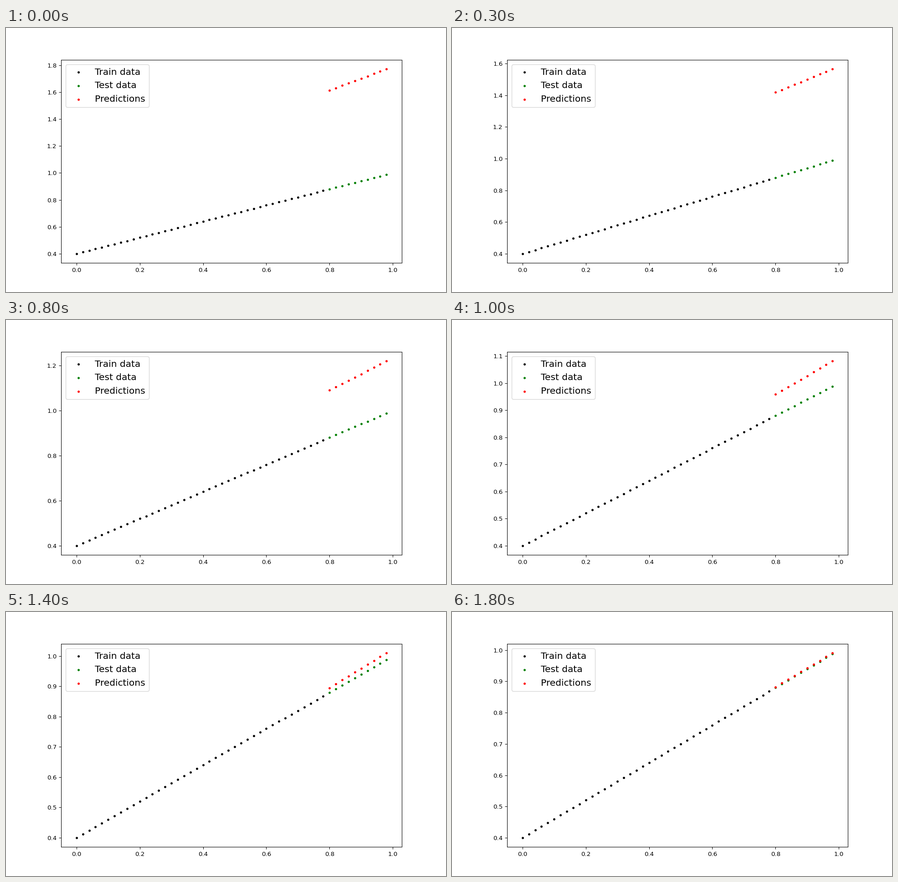
Animation of 966x580 px, one loop 1.9 s. Source, as a matplotlib script:

```python
import numpy as np
import matplotlib.pyplot as plt
from matplotlib.animation import FuncAnimation

FRAMES = 19
INTERVAL = 100
EPOCHS_PER_FRAME = 10
RATE = 0.005
DOT = 7

x = np.arange(50) * 0.02
y = 0.6 * x + 0.4
x_train, x_test = x[:40], x[40:]
y_train, y_test = y[:40], y[40:]


def train(weight=0.882269, bias=0.915004):
    """Fit a line by gradient descent on the mean absolute error."""
    history = []
    for epoch in range(FRAMES * EPOCHS_PER_FRAME):
        sign = np.sign(weight * x_train + bias - y_train)
        weight -= RATE * np.mean(sign * x_train)
        bias -= RATE * np.mean(sign)
        if epoch % EPOCHS_PER_FRAME == 0:
            history.append((weight, bias))
    return history


history = train()
# 966 x 580 pixels
fig, ax = plt.subplots(figsize=(10, 6.0042), dpi=96.6)


def draw(frame):
    weight, bias = history[frame]
    ax.clear()
    ax.scatter(x_train, y_train, c="k", s=DOT, label="Train data")
    ax.scatter(x_test, y_test, c="g", s=DOT, label="Test data")
    ax.scatter(x_test, weight * x_test + bias, c="r", s=DOT, label="Predictions")
    ax.legend(loc="upper left", fontsize=15, labelspacing=0.525)
    return ax.collections


anim = FuncAnimation(fig, draw, frames=FRAMES, interval=INTERVAL,
                     init_func=lambda: draw(0), repeat=True, repeat_delay=0)
plt.show()
```
